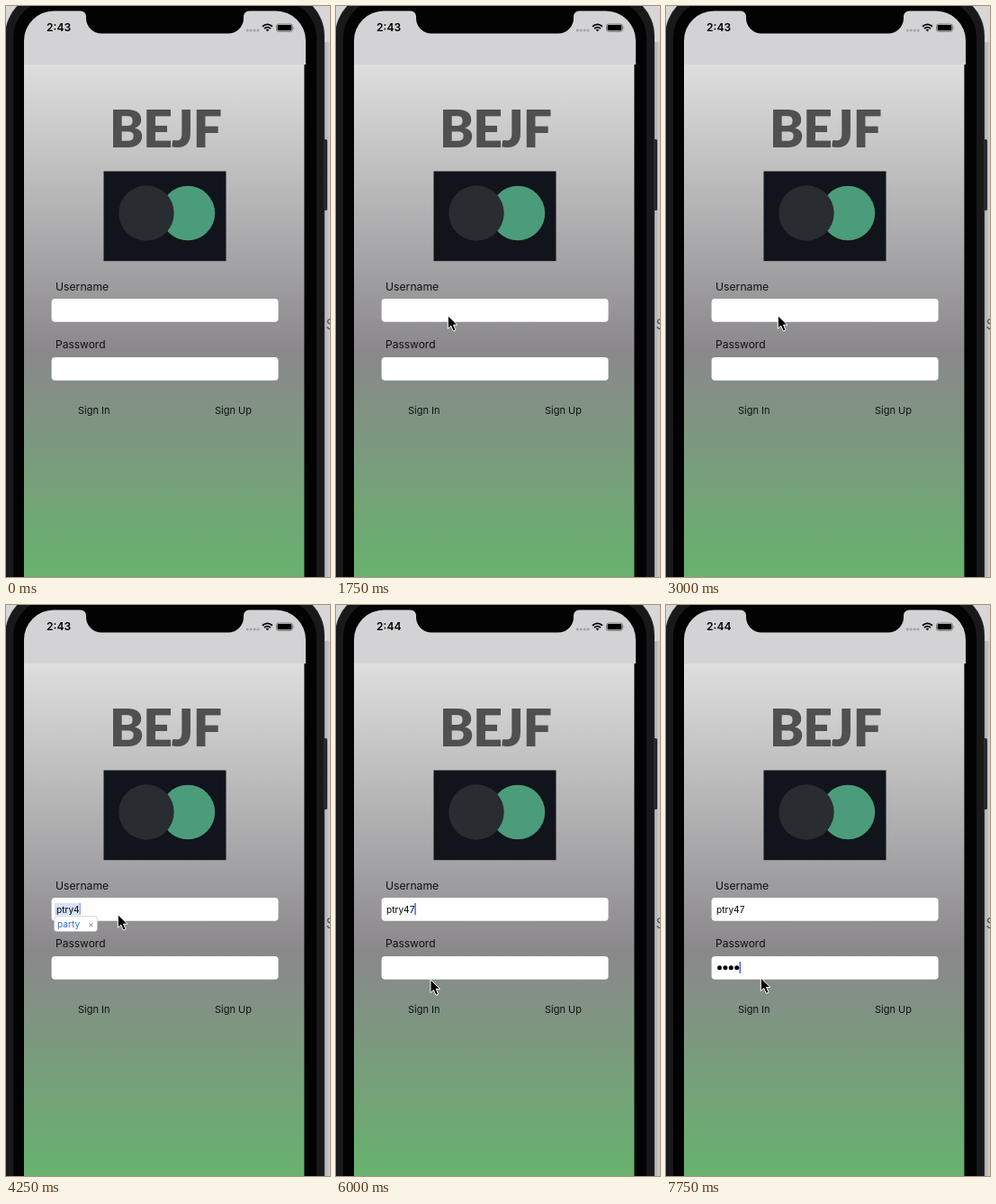
These frames come from a looping animation (360 px wide and 634 px high, 8 s). An HTML page:

```html
<!DOCTYPE html>
<html lang="en">
<head>
<meta charset="utf-8">
<title>Sign in</title>
<style>
  html, body { margin: 0; width: 100%; height: 100%; overflow: hidden; background: #d8d6d7; }
  svg { display: block; width: 100vw; height: 100vh; }
  text { font-family: Inter, Roboto, sans-serif; fill: #101010; white-space: pre; }
  .label { font-size: 12.2px; }
  .button { font-size: 11px; }
  .entry { font-size: 10.1px; fill: #000; }
  .clock { font-size: 12.1px; font-weight: 600; fill: #000; }
  .title { font: 900 57px Lato, sans-serif; letter-spacing: -1px; fill: #505050; }
</style>
</head>
<body>
<svg viewBox="0 0 360 634">
  <defs>
    <linearGradient id="sky" gradientUnits="userSpaceOnUse" x1="0" y1="65" x2="0" y2="634">
      <stop offset="0" stop-color="#dedede"/>
      <stop offset=".56" stop-color="#8a888b"/>
      <stop offset="1" stop-color="#67b26d"/>
    </linearGradient>
    <linearGradient id="shade" gradientUnits="userSpaceOnUse" x1="353" y1="0" x2="360" y2="0">
      <stop offset="0" stop-color="#a9a8a9"/>
      <stop offset="1" stop-color="#d0cecf"/>
    </linearGradient>
    <clipPath id="screen">
      <path d="M20 650V38.5A33 33 0 0 1 53 5.5H83A6 6 0 0 1 89 11.5V13.5A17 17 0 0 0 106 30.5H247A17 17 0 0 0 264 13.5V11.5A6 6 0 0 1 270 5.5H300A33 33 0 0 1 333 38.5V650Z"/>
    </clipPath>
  </defs>

  <!-- desktop and phone body -->
  <rect width="360" height="634" fill="#d8d6d7"/>
  <rect x="353" y="40" width="7" height="594" fill="url(#shade)"/>
  <text x="355.5" y="358.5" font-size="16" style="fill:#555">S</text>
  <rect x="350" y="148" width="7" height="79" rx="1.5" fill="#29292b"/>
  <rect x="-1" y="-15" width="355" height="720" rx="48" fill="#2c2c2e"/>
  <rect x="0" y="-14" width="353" height="718" rx="47" fill="#19191b"/>
  <rect x="8" y="-6" width="337" height="700" rx="41" fill="#030304"/>

  <!-- screen -->
  <g clip-path="url(#screen)">
    <rect x="20" y="5" width="313" height="60" fill="#d3d2d4"/>
    <rect x="20" y="65" width="311.4" height="569" fill="url(#sky)"/>
  </g>

  <!-- status bar -->
  <text id="clock" class="clock" x="45" y="28.3"></text>
  <g fill="#a3a2a5">
    <circle cx="268.3" cy="27" r="1.5"/><circle cx="272.2" cy="27" r="1.5"/>
    <circle cx="276.1" cy="27" r="1.5"/><circle cx="280" cy="27" r="1.5"/>
  </g>
  <g fill="none" stroke="#000" stroke-width="1.8">
    <path d="M285 22.8Q290.5 18 296 22.8M287 25.2Q290.5 22 294 25.2"/>
    <path d="M288.7 26.4Q290.5 25 292.3 26.4L290.5 28.3Z" fill="#000" stroke="none"/>
  </g>
  <rect x="300.5" y="20" width="18" height="8.4" rx="2.4" fill="none" stroke="#777" stroke-width=".9"/>
  <rect x="301.6" y="21.1" width="15.8" height="6.2" rx="1.4"/>
  <path d="M319.6 22.7Q321.3 24.2 319.6 25.7Z" fill="#777"/>

  <!-- form -->
  <text class="title" x="177" y="156.5" text-anchor="middle">BEJF</text>
  <rect x="108.5" y="183.5" width="136" height="99.7" fill="#12141b"/>
  <circle cx="202" cy="230" r="30.2" fill="#4b9c7b"/>
  <circle cx="156" cy="230" r="30.7" fill="#292c30"/>
  <text class="label" x="55" y="316.3">Username</text>
  <text class="label" x="55" y="380.3" style="font-size:12px">Password</text>
  <rect x="50.6" y="325" width="252" height="25.7" rx="4" fill="#fff"/>
  <rect x="50.6" y="390" width="252" height="25.7" rx="4" fill="#fff"/>
  <text class="button" x="80" y="453">Sign In</text>
  <text class="button" x="232" y="453">Sign Up</text>

  <!-- changing parts -->
  <g id="hint">
    <rect x="54" y="331" width="28.5" height="13.5" fill="#d6e2fb"/>
    <rect x="53.5" y="345.5" width="48" height="17" rx="3" fill="#fff" stroke="#bbb" stroke-width=".6"/>
    <text class="entry" x="57" y="357.5" style="fill:#3768d4">party</text>
    <text class="entry" x="91" y="357.5" style="fill:#888">×</text>
  </g>
  <text id="user" class="entry" x="56" y="341.6"></text>
  <g id="dots"></g>
  <rect id="caret" width="1.4" height="13" fill="#3c62d6"/>
  <path id="pointer" d="M0 0V14.6L3.4 11.4L6 17.3L8.7 16.1L6.2 10.4H10.6Z"
        fill="#000" stroke="#fff" stroke-width="1" stroke-linejoin="round"/>
</svg>
<script>
  const LOOP = 8000, LEFT = 56, DOT_STEP = 6.4;
  const $ = id => document.getElementById(id);

  // Each step lists only what changes at that time (ms).
  const steps = [
    [0, { clock: '2:43', user: '', dots: 0, caret: 0, row: 331, hint: false, pointer: null }],
    [1000, { pointer: [211, 276] }],
    [1250, { pointer: [165, 322] }],
    [1500, { pointer: [117, 355] }],
    [1750, { pointer: [124.3, 343.7] }],
    [2250, { caret: 1 }],
    [3000, { caret: 0 }],
    [3250, { user: 'p', caret: 1 }],
    [3500, { user: 'ptr' }],
    [3750, { user: 'ptry4' }],
    [4250, { hint: true, caret: .5 }],
    [4500, { clock: '2:44', caret: 0 }],
    [4750, { user: 'ptry47', hint: false, caret: 1 }],
    [5000, { pointer: [116.5, 380] }],
    [5250, { pointer: [108, 406], caret: .5 }],
    [5500, { pointer: [104.5, 418], caret: 0 }],
    [5750, { caret: 1 }],
    [6000, { pointer: [105, 416] }],
    [6250, { pointer: [105, 415], caret: 0, row: 396 }],
    [6500, { caret: 1 }],
    [7000, { pointer: [105.3, 414], dots: 1 }],
    [7250, { dots: 2 }],
    [7500, { dots: 3 }],
    [7750, { dots: 4 }]
  ];

  let last = {};
  const states = steps.map(([at, change]) => last = { ...last, ...change, at });

  const dots = Array.from({ length: 4 }, (_, i) => {
    const dot = document.createElementNS('http://www.w3.org/2000/svg', 'circle');
    dot.setAttribute('cx', 59.5 + i * DOT_STEP);
    dot.setAttribute('cy', 402.8);
    dot.setAttribute('r', 2.5);
    return $('dots').appendChild(dot);
  });

  const show = (node, on) => node.setAttribute('visibility', on ? 'visible' : 'hidden');

  function draw(state) {
    $('clock').textContent = state.clock;
    $('user').textContent = state.user;
    show($('hint'), state.hint);
    dots.forEach((dot, i) => show(dot, i < state.dots));

    const typed = state.row > 390 ? state.dots * DOT_STEP : $('user').getComputedTextLength();
    $('caret').setAttribute('x', LEFT + typed);
    $('caret').setAttribute('y', state.row);
    $('caret').setAttribute('opacity', state.caret);

    show($('pointer'), state.pointer);
    if (state.pointer) $('pointer').setAttribute('transform', `translate(${state.pointer})`);
  }

  const start = performance.now();
  function tick() {
    const time = (performance.now() - start) % LOOP;
    draw(states.findLast(state => state.at <= time));
    requestAnimationFrame(tick);
  }
  tick();
</script>
</body>
</html>
```
